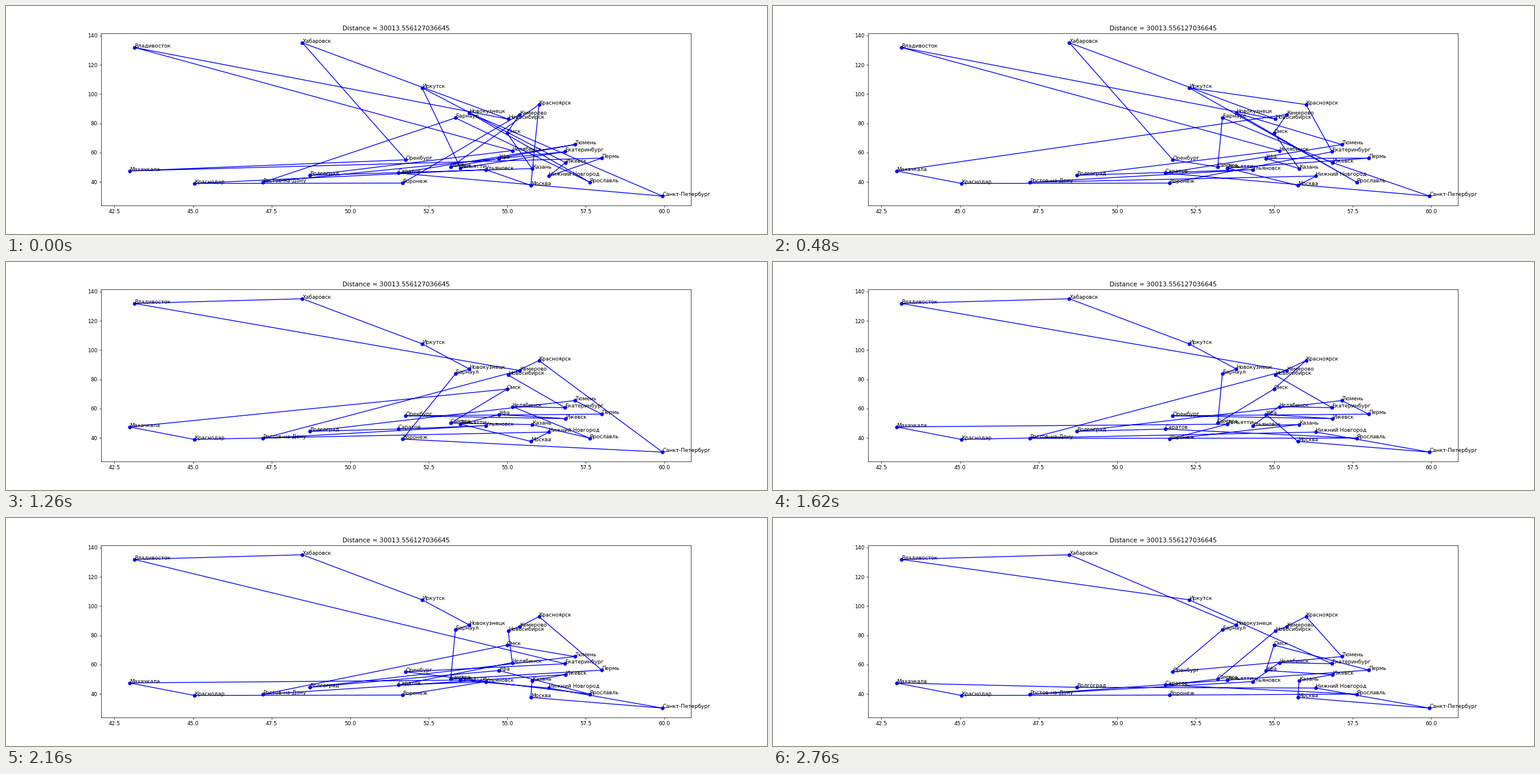
These frames come from a looping animation (1280 by 384 pixels, 2820 ms). A matplotlib script:

```python
import numpy as np
import matplotlib.pyplot as plt
from matplotlib.animation import FuncAnimation

FRAMES, STEP_MS = 47, 60

# code: (label, latitude, longitude)
CITIES = {
    "MO": ("Москва", 55.75, 37.62),
    "SP": ("Санкт-Петербург", 59.94, 30.31),
    "NS": ("Новосибирск", 55.03, 82.92),
    "EK": ("Екатеринбург", 56.84, 60.61),
    "NN": ("Нижний Новгород", 56.33, 44.00),
    "KZ": ("Казань", 55.79, 49.12),
    "SA": ("Самара", 53.20, 50.15),
    "OM": ("Омск", 54.99, 73.37),
    "CH": ("Челябинск", 55.16, 61.40),
    "RO": ("Ростов-на-Дону", 47.23, 39.72),
    "UF": ("Уфа", 54.74, 55.97),
    "VG": ("Волгоград", 48.71, 44.51),
    "PE": ("Пермь", 58.01, 56.25),
    "KR": ("Красноярск", 56.01, 92.85),
    "VO": ("Воронеж", 51.67, 39.18),
    "SR": ("Саратов", 51.53, 46.03),
    "KD": ("Краснодар", 45.04, 38.98),
    "TO": ("Тольятти", 53.51, 49.42),
    "BA": ("Барнаул", 53.35, 83.76),
    "IZ": ("Ижевск", 56.85, 53.20),
    "UL": ("Ульяновск", 54.31, 48.40),
    "VL": ("Владивосток", 43.13, 131.91),
    "YA": ("Ярославль", 57.62, 39.87),
    "IR": ("Иркутск", 52.29, 104.30),
    "TY": ("Тюмень", 57.15, 65.53),
    "MA": ("Махачкала", 42.98, 47.50),
    "KH": ("Хабаровск", 48.48, 135.08),
    "OR": ("Оренбург", 51.77, 55.10),
    "NK": ("Новокузнецк", 53.79, 87.11),
    "KE": ("Кемерово", 55.39, 86.05),
}

# Closed tours the search passes through, keyed by step
TOURS = {
    0: "TY SA KR MO UL KD VO KE OM KZ VG CH VL NS KH "
       "OR MA PE NN IZ IR TO EK UF RO BA YA NK SP SR",
    8: "VL NS KH OR SA BA IZ SP SR TY NK YA IR KR EK "
       "VO KD MA KE OM KZ UF PE TO MO NN RO UL VG CH",
    14: "VL KR IR NK BA SA OR KH NS EK CH VG KZ KE OM "
        "MA KD NN MO TO UF PE SP IZ TY RO SR UL YA VO",
    21: "VL KH IR NK BA VO SP KR NS EK CH YA KZ SA OM "
        "MA KD NN MO TO UF IZ OR PE TY VG SR UL RO KE",
    32: "VL KH IR NK BA SA PE KR KE NS CH UL KZ VO TO "
        "MA KD NN SP MO UF IZ RO OM TY VG SR YA OR EK",
    41: "PE SA KR KE NS OR SR UL VO KD MA TO NN SP MO "
        "KZ IZ UF OM TY VG RO YA CH EK IR VL KH NK BA",
    46: "PE OM UF IZ KZ MO SP NN VG MA KD VO YA SR SA "
        "NS KE KR TY OR BA NK KH VL IR EK CH UL RO TO",
}


def align(tour, reference):
    """Rotate or reverse a closed tour to agree with the reference."""
    options = [t[k:] + t[:k] for t in (tour, tour[::-1]) for k in range(len(t))]
    return max(options, key=lambda t: sum(a == b for a, b in zip(t, reference)))


def swaps_between(start, end):
    """Position swaps that turn one tour into the other."""
    work, swaps = list(start), []
    for i, city in enumerate(end):
        if work[i] != city:
            j = work.index(city)
            work[i], work[j] = work[j], work[i]
            swaps.append((i, j))
    return swaps


def build_history():
    steps = sorted(TOURS)
    tour = TOURS[0].split()
    history = [tour]
    for first, last in zip(steps, steps[1:]):
        target = align(TOURS[last].split(), tour)
        swaps = swaps_between(tour, target)
        count = last - first
        for k in range(1, count + 1):
            current = list(tour)
            for i, j in swaps[:round(len(swaps) * k / count)]:
                current[i], current[j] = current[j], current[i]
            history.append(current)
        tour = target
    return history


HISTORY = build_history()

plt.rcParams.update({"font.family": "DejaVu Sans", "font.size": 10})
fig = plt.figure(figsize=(20, 6), dpi=64, facecolor="white")
ax = fig.add_axes([0.125, 0.125, 0.775, 0.755])
ax.set_xlim(42.0765, 60.8435)
ax.set_ylim(23.88, 141.51)
ax.set_xticks(np.arange(42.5, 60.1, 2.5))
ax.set_yticks(range(40, 141, 20))
ax.set_title("Distance = 30013.556127036645")

route, = ax.plot([], [], "b-", lw=1.5)
for label, lat, lon in CITIES.values():
    ax.plot(lat, lon, "bo", ms=6)
    ax.annotate(label, (lat, lon))


def update(frame):
    tour = HISTORY[frame]
    points = [CITIES[code][1:] for code in tour + tour[:1]]
    route.set_data(*zip(*points))
    return route,


anim = FuncAnimation(fig, update, frames=FRAMES, interval=STEP_MS, repeat=True)
plt.show()
```
